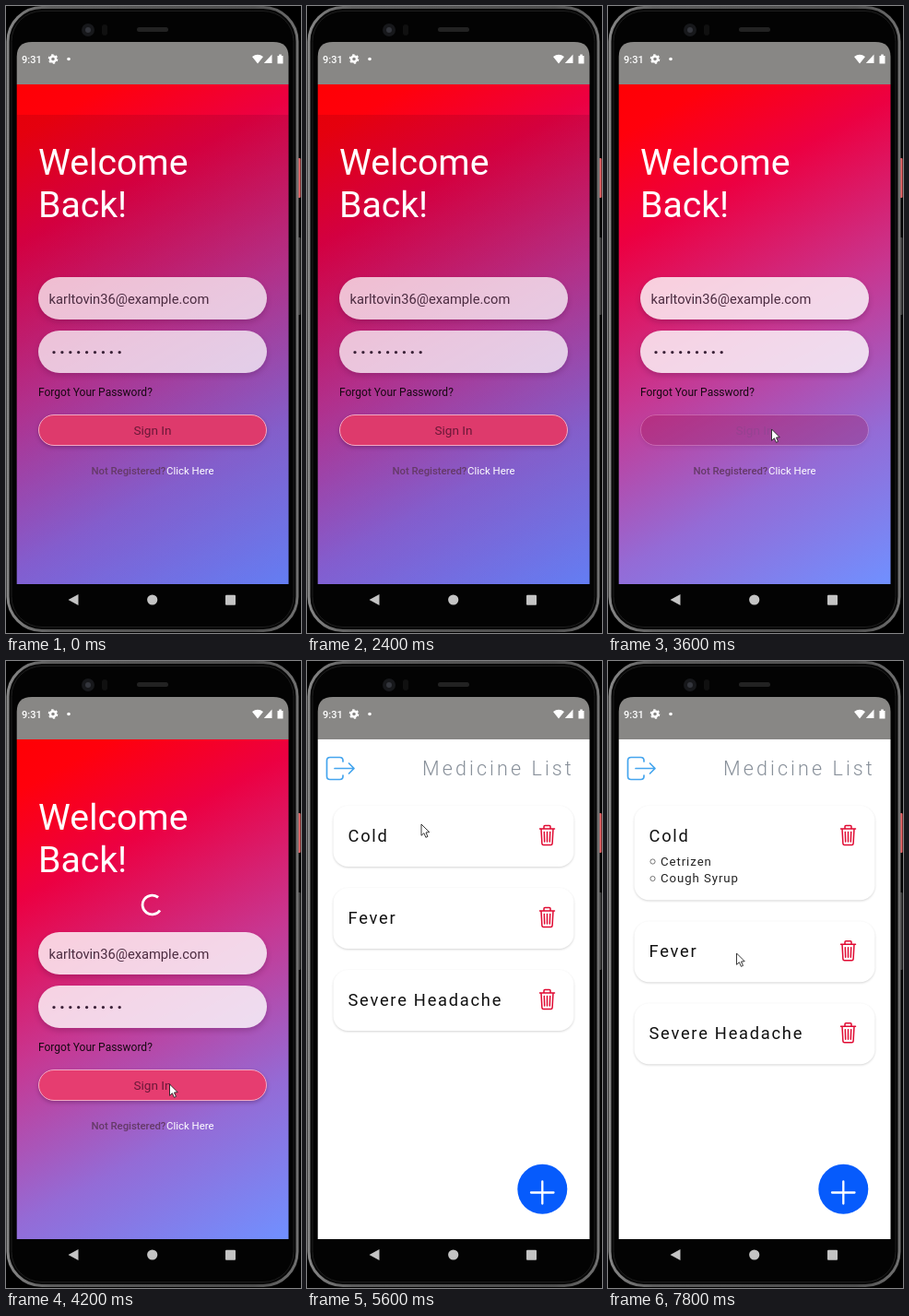
Animation, 320 px wide and 680 px high, one loop 8000 ms. Source, as an HTML page:

```html
<!DOCTYPE html>
<html lang="en">
<head>
<meta charset="utf-8">
<title>Medicine list app</title>
<style>
  html, body { margin: 0; width: 100%; height: 100%; overflow: hidden; background: #000; }
  svg { display: block; width: 100vw; height: 100vh; font-family: Roboto, sans-serif; }
  .card { fill: #fff; filter: drop-shadow(0 1px 1px rgba(0, 0, 0, .17)); }
  .field { fill: #fff; filter: drop-shadow(0 3px 3px rgba(60, 0, 50, .3)); }
  .line { fill: none; stroke-linecap: round; stroke-linejoin: round; }
  .name { font-size: 18.3px; letter-spacing: 1.75px; fill: #111; }
  .sub { font-size: 13.2px; letter-spacing: .94px; fill: #222; }
</style>
</head>
<body>
<svg viewBox="0 0 320 680">
  <defs>
    <linearGradient id="sky" gradientUnits="userSpaceOnUse" x1="12" y1="85" x2="306" y2="627">
      <stop stop-color="#ff0004"/><stop offset=".08" stop-color="#ff000c"/>
      <stop offset=".25" stop-color="#ec0042"/><stop offset=".5" stop-color="#c83690"/>
      <stop offset=".75" stop-color="#946bd6"/><stop offset="1" stop-color="#7090ff"/>
    </linearGradient>
    <linearGradient id="dim" x2="0" y2="1">
      <stop stop-color="#100018" stop-opacity=".11"/><stop offset="1" stop-color="#1000a0" stop-opacity=".13"/>
    </linearGradient>
    <linearGradient id="rim">
      <stop stop-color="#868686"/><stop offset=".15" stop-color="#5c5c5c"/>
      <stop offset=".85" stop-color="#4c4c4c"/><stop offset="1" stop-color="#707070"/>
    </linearGradient>
    <clipPath id="screen"><rect x="11.700" y="85" width="294.800" height="542"/></clipPath>
    <g id="trash" class="line" stroke="#e00a32" stroke-width="1.5">
      <path d="M-8 -7H8M-3.5 -7V-9.5Q-3.5 -10.5 -2.5 -10.5H2.5Q3.5 -10.5 3.5 -9.5V-7M-6.5 -7L-5.6 9Q-5.5 10.5 -4 10.5H4Q5.5 10.5 5.6 9L6.5 -7M0 -3.5V7M-3.2 -3.5L-2.8 7M3.2 -3.5L2.8 7"/>
    </g>
  </defs>

  <!-- phone -->
  <rect width="320" height="680"/>
  <rect x="315" y="165" width="4.500" height="43" rx="1" fill="#ee6264"/>
  <rect x="315" y="251" width="4.500" height="84" rx="1" fill="#3b3b3b"/>
  <rect x="2" y="1.500" width="314" height="676" rx="37" fill="#070707" stroke="url(#rim)" stroke-width="3"/>
  <rect x="6" y="5.500" width="306" height="668" rx="33" fill="#030303" stroke="#1d1d1d"/>
  <circle cx="89" cy="26" r="7" fill="#17181b"/>
  <circle cx="89" cy="26" r="3" fill="#34363d"/>
  <rect x="104" y="20" width="6" height="12" rx="3" fill="#101010"/>
  <rect x="142" y="23" width="34" height="5" rx="2.5" fill="#222"/>
  <path d="M11.700 85V55Q11.700 39 28 39H290Q306.500 39 306.500 55V85Z" fill="#888785"/>
  <g fill="#fff">
    <text x="17" y="61.500" font-size="11" font-weight="500">9:31</text>
    <circle cx="51" cy="57.500" r="3" fill="none" stroke="#fff" stroke-width="2.4"/>
    <circle cx="51" cy="57.500" r="4.600" fill="none" stroke="#fff" stroke-width="1.500" stroke-dasharray="2.400 2.417"/>
    <circle cx="68" cy="57.500" r="1.800"/>
    <path d="M267 55Q273 50.500 279 55L273 62.500ZM288.500 52.500V62H279.800Z"/>
    <path d="M294.500 54H296.200V52.500H298.800V54H300.500V62.500H294.500Z"/>
  </g>
  <g fill="#c4c4c4">
    <path d="M67.500 644L78.500 638V650Z"/><circle cx="158.700" cy="644" r="5.600"/><rect x="238" y="638.700" width="11" height="11" rx="1"/>
  </g>

  <g clip-path="url(#screen)">
    <g id="login">
      <rect x="11" y="85" width="296" height="542" fill="url(#sky)"/>
      <rect id="shade" x="11" y="118" width="296" height="509" fill="url(#dim)"/>
      <g font-size="39.2" fill="#fff"><text x="35" y="183.200">Welcome</text><text x="35" y="229.200">Back!</text></g>
      <g id="fields">
        <rect class="field" x="35" y="294" width="248" height="46" rx="23"/>
        <rect class="field" x="35" y="352" width="248" height="46" rx="23"/>
      </g>
      <text x="46.500" y="322.500" font-size="14.7" fill="#4b2b40">karltovin36@example.com</text>
      <path class="line" d="M52 375.600H124" stroke="#3b2238" stroke-width="3.400" stroke-dasharray="0 8.900"/>
      <text x="35" y="423" font-size="12" fill="#170812">Forgot Your Password?</text>
      <g id="button">
        <rect id="fill" x="35.500" y="443.500" width="247" height="33" rx="16.500" stroke="#f3a9c4" style="filter: drop-shadow(0 2px 2px rgba(50, 0, 50, .3))"/>
        <text x="159" y="465" font-size="13.6" text-anchor="middle" fill="#6b1838">Sign In</text>
      </g>
      <g font-size="11.4">
        <text x="92.500" y="508" fill="#653a68" font-weight="500" letter-spacing="-.05">Not Registered?</text>
        <text x="174" y="508" fill="#fff">Click Here</text>
      </g>
      <circle id="spinner" class="line" cx="158.500" cy="264.500" r="10.400" stroke="#fff" stroke-width="2.800" style="stroke-linecap: butt" stroke-dasharray="49.500 20"/>
    </g>

    <g id="list">
      <rect x="0" y="70" width="320" height="570" fill="#fff"/>
      <path class="line" d="M39 109V108Q39 104.500 35.500 104.500H25Q21.500 104.500 21.500 108V125Q21.500 128.500 25 128.500H35.500Q39 128.500 39 125V124M30 116.500H51M45.500 111L51 116.500L45.500 122" stroke="#45a5ee" stroke-width="1.700"/>
      <text x="125" y="124" font-size="21.5" font-weight="300" letter-spacing="3.1" fill="#88909a">Medicine List</text>
      <g>
        <rect id="open" class="card" x="28.500" y="157" width="261" height="66" rx="16"/>
        <text class="name" x="44.500" y="196">Cold</text>
        <use href="#trash" x="260.500" y="189"/>
        <g id="drugs">
          <circle cx="48.500" cy="217.500" r="2.600" fill="none" stroke="#555" stroke-width=".8"/>
          <text class="sub" x="57" y="221.500">Cetrizen</text>
          <circle cx="48.500" cy="236" r="2.600" fill="none" stroke="#555" stroke-width=".8"/>
          <text class="sub" x="57" y="240">Cough Syrup</text>
        </g>
      </g>
      <g id="rest">
        <rect class="card" x="28.500" y="246" width="261" height="66" rx="16"/>
        <text class="name" x="44.500" y="285">Fever</text>
        <use href="#trash" x="260.500" y="278"/>
        <rect class="card" x="28.500" y="335" width="261" height="66" rx="16"/>
        <text class="name" x="44.500" y="374">Severe Headache</text>
        <use href="#trash" x="260.500" y="367"/>
      </g>
      <circle cx="255.300" cy="572.800" r="27" fill="#065bfc"/>
      <path class="line" d="M243 576.500H267.500M255.300 564.500V588.500" stroke="#fff" stroke-width="2.300"/>
    </g>
  </g>

  <path id="cursor" d="M0 0V12.300L2.900 9.700L4.900 14.300L7 13.400L5 9L8.700 8.700Z" fill="#fff" stroke="#222" stroke-width=".9"/>
</svg>
<script>
  const LOOP = 8000, STEP = 200;
  const part = id => document.getElementById(id);
  const show = (id, on) => part(id).setAttribute('display', on ? 'inline' : 'none');

  // rows: time, values...
  const cursorPath = [
    [2600, 292, 590], [3000, 215, 505], [3400, 177.5, 459], [4600, 177.5, 459],
    [5600, 124, 177], [5800, 124, 177], [6000, 124, 184], [7200, 124, 184], [7800, 139.5, 317]
  ];
  const unfold = [[5800, 0], [6000, .3], [6200, 1.2], [6400, .95], [6600, 1]];

  function sample(rows, t) {
    const next = rows.findIndex(row => row[0] > t);
    if (next < 0) return rows[rows.length - 1].slice(1);
    if (next === 0) return rows[0].slice(1);
    const a = rows[next - 1], b = rows[next];
    const p = (t - a[0]) / (b[0] - a[0]);
    return a.slice(1).map((v, i) => v + (b[i + 1] - v) * p);
  }

  function render(t) {
    const dimmed = t < 3600, pressed = t >= 3600 && t < 3800, listed = t >= 4600;
    show('login', !listed);
    show('list', listed);
    show('shade', dimmed);
    show('spinner', t >= 4000 && !listed);
    show('cursor', t >= 2600);

    part('fields').setAttribute('opacity', dimmed ? .73 : .8);
    part('fill').setAttribute('fill', pressed ? '#a0124e' : dimmed ? '#de3a6c' : '#e63d70');
    part('button').setAttribute('opacity', pressed ? .3 : 1);
    part('spinner').setAttribute('transform', `rotate(${35 + (t - 4200) * .36} 158.5 264.5)`);

    const zoom = t < 4800 ? 1.008 : 1;
    part('list').setAttribute('transform', `translate(159 356) scale(${zoom}) translate(-159 -356)`);

    const [open] = sample(unfold, t);
    const shift = 36.3 * open;
    part('open').setAttribute('height', 66 + shift);
    part('rest').setAttribute('transform', `translate(0 ${shift})`);
    part('drugs').setAttribute('opacity', Math.min(1, open));

    const [x, y] = sample(cursorPath, t);
    part('cursor').setAttribute('transform', `translate(${x} ${y})`);
  }

  const start = performance.now();
  function tick() {
    const t = (performance.now() - start) % LOOP;
    render(Math.floor(t / STEP) * STEP);
    requestAnimationFrame(tick);
  }
  tick();
</script>
</body>
</html>
```
